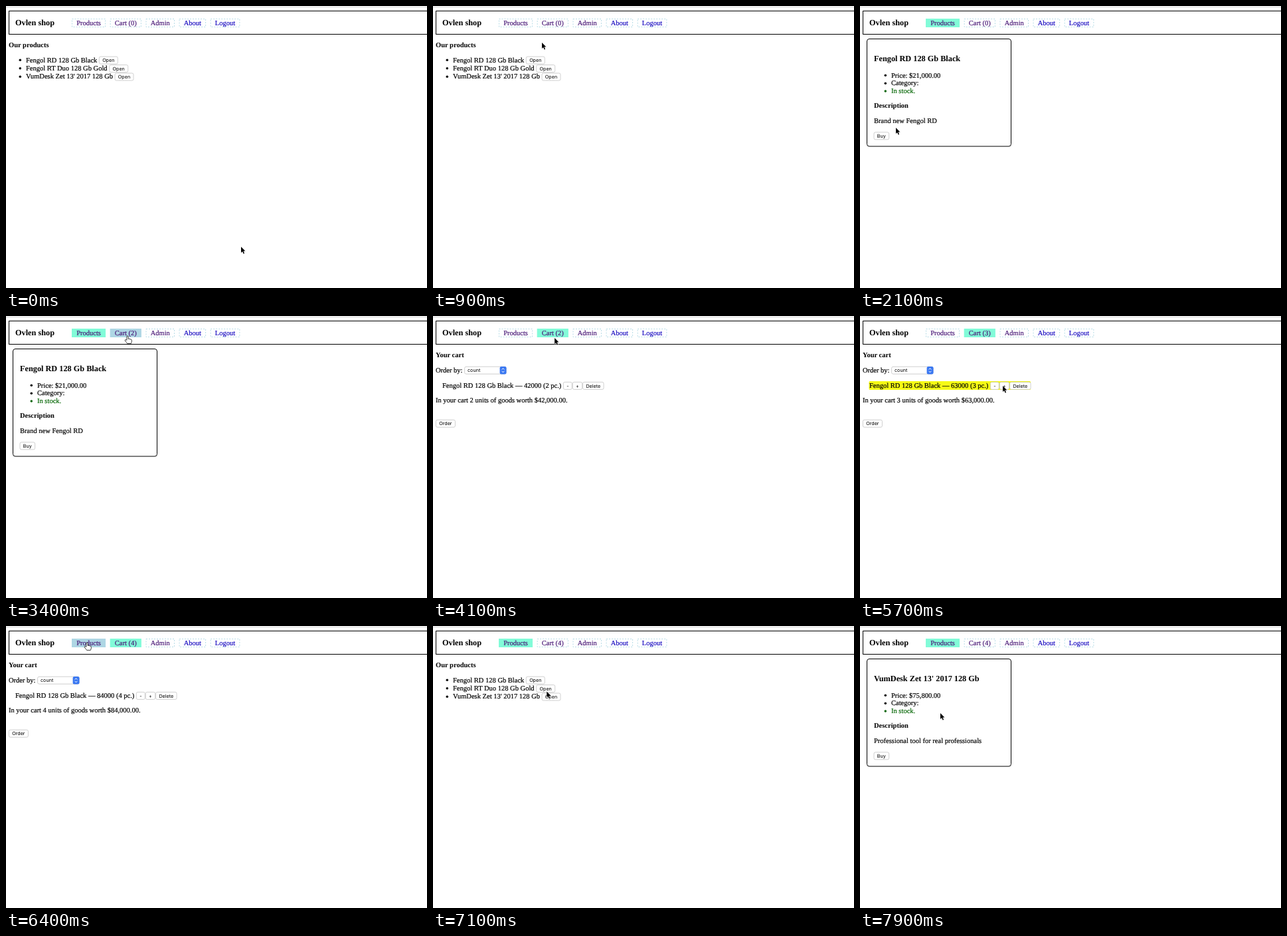
An HTML page for the animation above (8 s loop, 634x424 px).

```html
<!DOCTYPE html>
<html lang="en">
<head>
<meta charset="utf-8">
<title>Shop demo</title>
<style>
  html, body { margin: 0; width: 100%; height: 100%; overflow: hidden; background: #fff; }
  svg { display: block; width: 634px; height: 424px; }
  text {
    font: 10.5px "Liberation Serif", serif;
    text-rendering: geometricPrecision;
    white-space: pre;
    fill: currentColor;
    stroke: currentColor;
    stroke-width: .2;
  }
  .bold { font-weight: bold; stroke: none; }
  .title { font-weight: bold; font-size: 12.28px; stroke: none; }
  .ui { font: 7.2px Inter, sans-serif; stroke: none; }
  .visited { color: #4a1a78; }
  .fresh { color: #1a0dc0; }
  .stock { color: #006400; }
  .button { fill: #fff; stroke: #bcbcbc; stroke-width: .7; }
  .frame { fill: none; stroke: #000; }
  .link { fill: none; stroke: #b5dbe6; stroke-dasharray: 2 2; }
</style>
</head>
<body>
<svg viewBox="0 0 634 424">
  <g id="page"></g>
  <g id="cursor"></g>
</svg>
<script>
const LOOP = 8000, STEP = 100;
const page = document.getElementById('page');
const cursor = document.getElementById('cursor');
const ruler = document.createElement('canvas').getContext('2d');

const phone = 'Fengol RD 128 Gb Black';
const laptop = "VumDesk Zet 13' 2017 128 Gb";

// Measured large and scaled down, so that widths are not rounded
function widthOf(string, size = 10.5, family = '"Liberation Serif", serif') {
  ruler.font = `100px ${family}`;
  return ruler.measureText(string).width * size / 100;
}

const inside = ([px, py], [x, y, w, h]) => px >= x && px <= x + w && py >= y && py <= y + h;
const text = (x, y, string, kind = '') => `<text x="${x}" y="${y}" class="${kind}">${string}</text>`;
const rect = ([x, y, w, h], attrs) => `<rect x="${x}" y="${y}" width="${w}" height="${h}" ${attrs}/>`;

function bulletItem(x, y, string, kind = '') {
  return `<circle cx="${x - 8.7}" cy="${y - 3.2}" r="1.75" fill="currentColor" class="${kind}"/>` +
    text(x, y, string, kind);
}

function buttons(x, y, ...labels) {
  return labels.map(label => {
    const w = widthOf(label, 7.2, 'Inter, sans-serif') + 9.6;
    const markup = rect([x, y - 8.4, w, 11], 'rx="2.2" class="button"') + text(x + 4.8, y - .3, label, 'ui');
    x += w + 1;
    return markup;
  }).join('');
}

function navLinks(count) {
  let x = 99;
  return ['Products', `Cart (${count})`, 'Admin', 'About', 'Logout'].map((label, i) => {
    const box = [x, 19, widthOf(label) + 14.3, 13];
    x += box[2] + 6.6;
    return { label, box, kind: i < 3 ? 'visited' : 'fresh' };
  });
}

function header(links, active, pointer) {
  const nav = links.map(({ label, box, kind }) => {
    const [x, y, w, h] = box;
    const fill = inside(pointer, box) ? '#aed6e4' : active && label.startsWith(active) ? '#82fbd8' : '';
    const back = fill ? rect(box, `fill="${fill}"`) : rect([x + .5, y + .5, w - 1, h - 1], 'class="link"');
    return back + text(x + 7.15, 29, label, kind);
  });
  return rect([0, 1, 634, 1], 'fill="#d4d4d4"') +
    rect([4.5, 7.5, 640, 35], 'class="frame"') +
    text(14, 29, 'Ovlen shop', 'title') + nav.join('');
}

function productList() {
  const items = [phone, 'Fengol RT Duo 128 Gb Gold', laptop].map((name, i) => {
    const y = 84.5 + i * 12.45;
    return bulletItem(30, y, name) + buttons(33 + widthOf(name), y, 'Open');
  });
  return text(4, 62.3, 'Our products', 'bold') + items.join('');
}

function productCard(name, price, description) {
  const facts = [`Price: ${price}`, 'Category:', 'In stock.'].map((fact, i) =>
    bulletItem(47, 107.5 + i * 11.9, fact, i === 2 ? 'stock' : ''));
  return rect([10.5, 49.5, 217, 161.5], 'rx="3.5" class="frame"') +
    text(21, 83, name, 'title') + facts.join('') +
    text(21, 153.4, 'Description', 'bold') +
    text(21, 175.6, description) +
    buttons(21, 198.2, 'Buy');
}

function cart(count, pointer) {
  const row = [13.5, 98, 243.5, 13];
  const summary = `${phone} — ${count * 21000} (${count} pc.)`;
  return text(4, 62.3, 'Your cart', 'bold') +
    text(4, 84.8, 'Order by:') +
    rect([47.6, 76.2, 62.6, 11], 'rx="2.4" class="button"') +
    text(52, 84.3, 'count', 'ui') +
    rect([100.6, 76, 9.9, 11.4], 'rx="2.2" fill="#3a78f2"') +
    '<path d="M103.7 80.6l1.8-2 1.8 2m-3.6 2.2l1.8 2 1.8-2" fill="none" stroke="#fff"/>' +
    (inside(pointer, row) ? rect(row, 'rx="1.5" fill="#f6fb16"') : '') +
    text(14, 107.8, summary) +
    buttons(17 + widthOf(summary), 107.8, '-', '+', 'Delete') +
    text(4, 130.4, `In your cart ${count} units of goods worth $${count * 21},000.00.`) +
    buttons(4.4, 164.6, 'Order');
}

// Each move: start, end, goal x, goal y, sideways sweep on the way
const moves = [
  [0, 300, 202, 92],
  [300, 900, 164, 55, -147],
  [900, 1200, 151, 83, 175],
  [1400, 2100, 54, 183],
  [2200, 2500, 33, 194],
  [2800, 3200, 183, 30],
  [4000, 4800, 185, 102],
  [4900, 5400, 215, 105, -170],
  [5900, 6400, 122, 25],
  [6700, 7200, 177, 107],
  [7400, 7900, 121, 131],
];

function pointerAt(t) {
  return moves.reduce(([x, y], [start, end, goalX, goalY, sweep = 0]) => {
    const k = Math.min(Math.max((t - start) / (end - start), 0), 1);
    const ease = k * k * (3 - 2 * k);
    return [x + (goalX - x) * ease + sweep * Math.sin(Math.PI * k), y + (goalY - y) * ease];
  }, [354, 362]);
}

const shapes = {
  arrow: '<path d="M0 0V9L2.1 7.1 3.6 10.5 5.1 9.9 3.6 6.5H6.4Z" stroke="#fff" paint-order="stroke"/>',
  hand: '<path d="M-1.1 6.4V1a1.1 1.1 0 0 1 2.2 0V4.4q1.1-.7 1.9.3 1.1-.5 1.8.5 1.5-.2 1.5 1.2V8q0 1.5-1 3.4H-.4Q-1.4 9.8-3.8 7-3.9 5.2-2.3 5.6Z" fill="#fff" stroke="#111" stroke-width=".8"/>',
  beam: '<path d="M-2-4.6Q0-4.6 0-3.4V3.4Q0 4.6-2 4.6M2-4.6Q0-4.6 0-3.4V3.4Q0 4.6 2 4.6M-1 1.2H1" fill="none" stroke="#222" stroke-width=".8"/>',
};

function overText(pointer) {
  return [...page.querySelectorAll('text:not(.ui)')].some(node => {
    const { x, y, width, height } = node.getBBox();
    return inside(pointer, [x, y, width, height]);
  });
}

function draw(t) {
  const pointer = pointerAt(t);
  const count = [2600, 2800, 5600, 5900].filter(click => t >= click).length;
  const links = navLinks(count);
  let active = 'Products', content;
  if (t < 1400) {
    active = '';
    content = productList();
  } else if (t < 3900) {
    content = productCard(phone, '$21,000.00', 'Brand new Fengol RD');
  } else if (t < 6700) {
    active = 'Cart';
    content = cart(count, pointer);
  } else if (t < 7400) {
    content = productList();
  } else {
    content = productCard(laptop, '$75,800.00', 'Professional tool for real professionals');
  }
  page.innerHTML = header(links, active, pointer) + content;
  const overLink = links.some(link => inside(pointer, link.box));
  cursor.innerHTML = shapes[overLink ? 'hand' : overText(pointer) ? 'beam' : 'arrow'];
  cursor.setAttribute('transform', `translate(${pointer})`);
}

let shown = -1;
function tick() {
  const t = Math.floor(performance.now() % LOOP / STEP) * STEP;
  if (t !== shown) draw(shown = t);
  requestAnimationFrame(tick);
}
tick();
</script>
</body>
</html>
```
